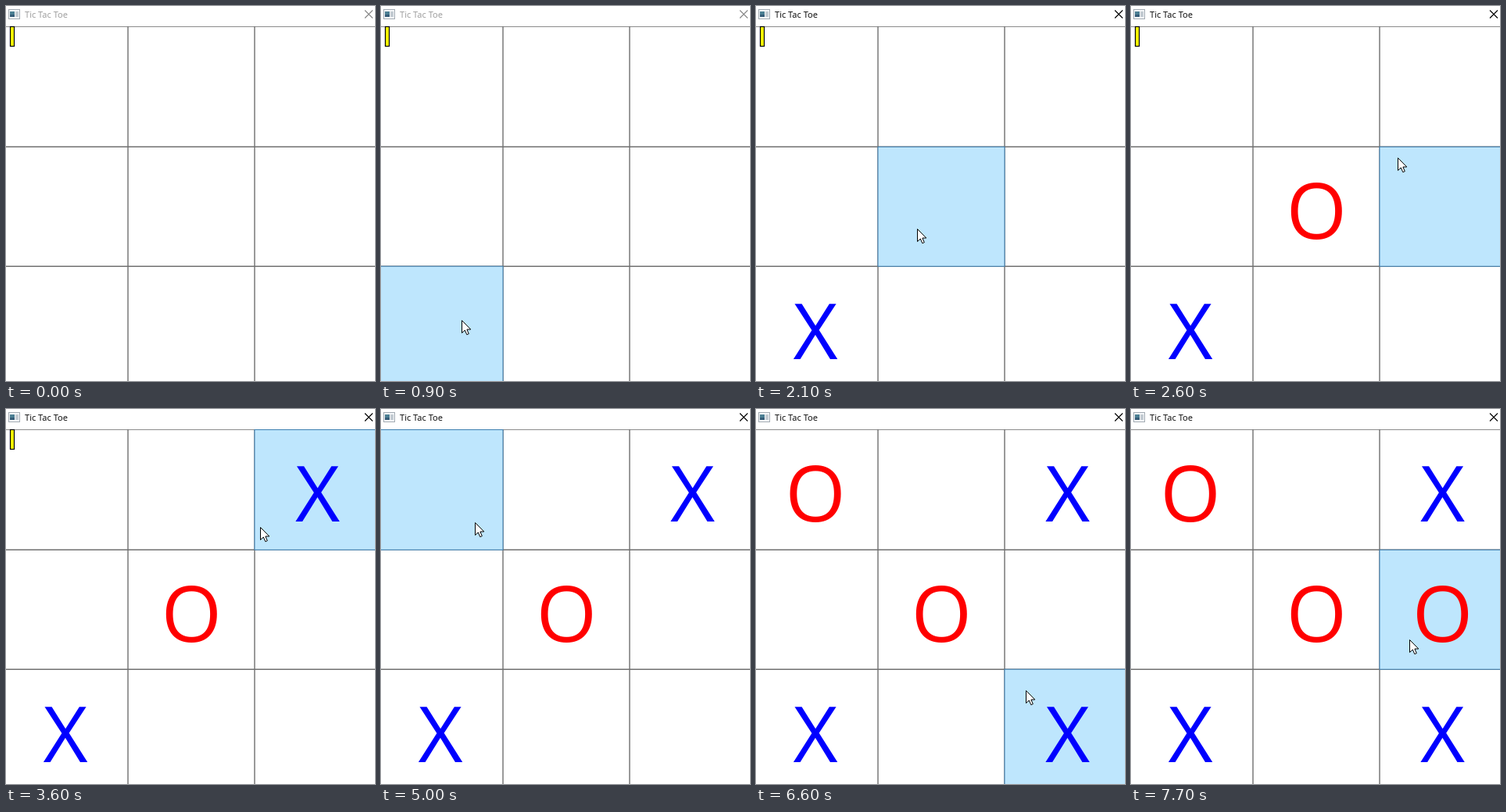
Recreate the animation shown at these times as an HTML page. Size 472 px wide and 480 px high, loop 8 s.

```html
<!DOCTYPE html>
<html lang="en">
<head>
<meta charset="utf-8">
<title>Tic Tac Toe</title>
<style>
  html, body { margin: 0; width: 100%; height: 100%; overflow: hidden; background: #fff; }
  svg { display: block; width: 472px; height: 480px; }
  .title { font: 11.1px "Open Sans", "Noto Sans", sans-serif; fill: #000; }
  .close { stroke: #000; stroke-width: 1.1; }
  .inactive .title { fill: #999; }
  .inactive .close { stroke: #888; }
  .mark { font: 99px "Open Sans", "Noto Sans", sans-serif; text-anchor: middle; }
  .X { fill: #00f; }
  .O { fill: #f00; }
</style>
</head>
<body>
<svg id="stage" viewBox="0 0 472 480">
  <rect width="472" height="480" fill="#fff"/>
  <g id="icon">
    <rect x="3.5" y="4.5" width="14" height="12" fill="#f4f6f8" stroke="#a3abb3"/>
    <rect x="5" y="7" width="6" height="7" fill="#4b7f93"/>
    <rect x="5" y="11" width="6" height="3" fill="#365d78"/>
    <rect x="12" y="7" width="4" height="7" fill="#c3cbd2"/>
  </g>
  <text class="title" x="24" y="15">Tic Tac Toe</text>
  <path class="close" d="M459 5.5l10 10M469 5.5l-10 10" fill="none"/>
  <path d="M0 26.5H472" stroke="#8c8c8c"/>
  <path d="M0 180.3H472M0 333.2H472M156 26V480M318 26V480" stroke="#707070" stroke-width="1.4"/>
  <rect id="hover" fill="#bee6fd" stroke="#3c7fb1"/>
  <g id="marks"></g>
  <rect id="handle" x="5.5" y="26.5" width="5" height="25" fill="#ff0" stroke="#000" stroke-width="1.2"/>
  <path id="cursor" d="M.5 .5V16.5L4.3 13L6.8 18.7L9.3 17.6L6.9 12H11.8Z" fill="#fff" stroke="#000"/>
</svg>
<script>
const LOOP = 8000, STEP = 100;
const COLS = [-1, 156, 318, 473], ROWS = [26.5, 180.3, 333.2, 481];

// symbol, column, row, time it appears
const MOVES = [
  ['X', 0, 2, 1200], ['O', 1, 1, 2200], ['X', 2, 0, 3200],
  ['O', 0, 0, 5100], ['X', 2, 2, 6200], ['O', 2, 1, 7700]
];

// time, x, y of the pointer tip
const PATH = [
  [400, 3, 430], [900, 103, 402], [1200, 103, 402], [1500, 164, 369],
  [1800, 206, 285], [2300, 206, 285], [2600, 341, 194], [2800, 366, 146],
  [3300, 366, 146], [3600, 325, 151], [3800, 120, 145], [5200, 120, 145],
  [5500, 192, 220], [5800, 324, 353], [5900, 335, 360], [6100, 335, 360],
  [6300, 345, 360], [6600, 345, 360], [7200, 356, 295]
];

const $ = id => document.getElementById(id);
const stage = $('stage'), hover = $('hover'), cursor = $('cursor'), handle = $('handle');

const marks = MOVES.map(([symbol, col, row, time]) => {
  const el = document.createElementNS(stage.namespaceURI, 'text');
  el.textContent = symbol;
  el.setAttribute('class', 'mark ' + symbol);
  el.setAttribute('x', 76 + col * 161.3);
  el.setAttribute('y', 144 + row * 154);
  $('marks').append(el);
  return { el, time };
});

const show = (el, on) => el.setAttribute('visibility', on ? 'visible' : 'hidden');

function pointerAt(t) {
  const next = PATH.findIndex(p => p[0] > t);
  if (next < 0) return PATH[PATH.length - 1].slice(1);
  const [t0, x0, y0] = PATH[next - 1], [t1, x1, y1] = PATH[next];
  const k = (t - t0) / (t1 - t0);
  return [x0 + (x1 - x0) * k, y0 + (y1 - y0) * k];
}

function highlight(x, y) {
  const col = x < COLS[1] ? 0 : x < COLS[2] ? 1 : 2;
  const row = y < ROWS[1] ? 0 : y < ROWS[2] ? 1 : 2;
  hover.setAttribute('x', COLS[col]);
  hover.setAttribute('y', ROWS[row]);
  hover.setAttribute('width', COLS[col + 1] - COLS[col]);
  hover.setAttribute('height', ROWS[row + 1] - ROWS[row]);
}

function render(t) {
  const pointing = t >= PATH[0][0];
  stage.classList.toggle('inactive', t < 1100);
  show(handle, t < 3700);
  show(cursor, pointing);
  show(hover, pointing);
  for (const { el, time } of marks) show(el, t >= time);
  if (pointing) {
    const [x, y] = pointerAt(t);
    cursor.setAttribute('transform', `translate(${Math.round(x)} ${Math.round(y)})`);
    highlight(x, y);
  }
}

const start = performance.now();
function tick() {
  const t = (performance.now() - start) % LOOP;
  render(Math.floor(t / STEP) * STEP);
  requestAnimationFrame(tick);
}
tick();
</script>
</body>
</html>
```
